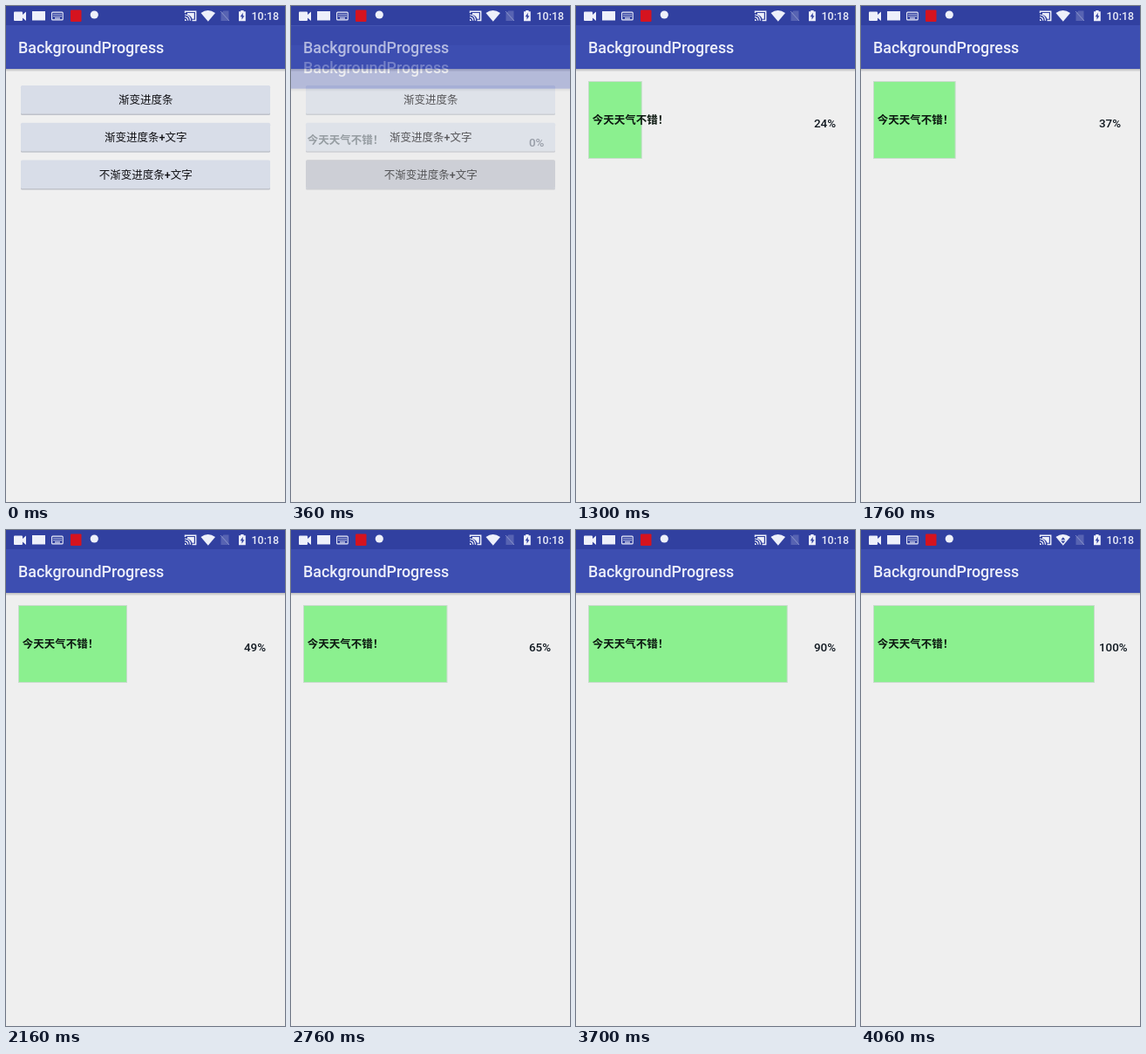
Recreate the animation shown at these times as an HTML page. Size 320 by 568 pixels, loop 4100 ms.

```html
<!DOCTYPE html>
<html lang="zh-CN">
<head>
<meta charset="utf-8">
<title>Progress</title>
<style>
  html, body { margin: 0; width: 100%; height: 100%; overflow: hidden; background: #eeeef0; }
  svg { display: block; width: 320px; height: 568px; }
  text { font-family: Roboto, "Noto Sans CJK SC", "Noto Sans CJK", sans-serif; }
  .title { font-size: 17.85px; font-weight: 500; fill: #edeffa; }
  .button { font-size: 12.5px; font-weight: 500; fill: #101014; text-anchor: middle; }
  .message { font-size: 12.5px; font-weight: 700; fill: #0c1810; }
  .percent { font-size: 13.4px; font-weight: 500; fill: #101820; }
  .clock { font-size: 12.44px; font-weight: 500; fill: #e9ebf7; }
</style>
</head>
<body>
<svg viewBox="0 0 320 568">
  <defs>
    <linearGradient id="shade" x2="0" y2="1">
      <stop stop-color="#000" stop-opacity=".22"/>
      <stop offset="1" stop-color="#000" stop-opacity="0"/>
    </linearGradient>
    <g id="bars">
      <rect y="72" width="320" height="3.5" fill="url(#shade)"/>
      <rect width="320" height="72" fill="#3d4eb1"/>
      <rect width="320" height="22" fill="#3140a0"/>
      <text class="title" x="14" y="54">BackgroundProgress</text>
    </g>
    <clipPath id="pressArea"><rect x="17" y="176" width="286" height="33" rx="2"/></clipPath>
  </defs>

  <rect class="page" width="320" height="568"/>
  <g id="menu"></g>
  <circle id="ripple" cx="160" cy="192" clip-path="url(#pressArea)"/>
  <use href="#bars"/>

  <g id="detail">
    <rect class="page" width="320" height="568"/>
    <use href="#bars"/>
    <rect id="fill" x="14.5" y="86.5" height="88" fill="#8bf08f" stroke="#c6dcca"/>
    <text class="message" x="18.7" y="135"><tspan>今天天气不错！</tspan></text>
    <text class="percent" id="percent" x="273" y="138.5"></text>
  </g>

  <g fill="#eef0fa">
    <path d="M10 6.5h8q1 0 1 1v2.6l4-3.6v10.5l-4-3.6v2.6q0 1-1 1h-8q-1 0-1-1v-8.5q0-1 1-1z"/>
    <rect x="30" y="6" width="15" height="10.5"/>
    <rect x="52.6" y="7.1" width="12.6" height="8.8" rx="1" fill="none" stroke="#eef0fa" stroke-width="1.1"/>
    <path d="M54.4 9.5h9.5M54.4 11.6h9.5" stroke="#eef0fa" stroke-width="1.2" stroke-dasharray="1.2 .8"/>
    <path d="M56 13.9h6" stroke="#eef0fa" stroke-width="1.2"/>
    <rect x="74" y="4.5" width="12.5" height="13.5" rx="1" fill="#d5131f"/>
    <circle cx="101.3" cy="10" r="4.6"/>
    <path d="M205.5 8V6.2h12.2v10.3h-4.2" fill="none" stroke="#eef0fa" stroke-width="1.4"/>
    <path d="M205 10q6.3.4 6.5 6.8M205 12.7q3.6.2 3.8 4.1" fill="none" stroke="#eef0fa" stroke-width="1.2"/>
    <path d="M205 15q1.8.1 1.9 2H205zM208 8h7.8v6.8h-2.4q-.8-3.7-5.4-5z"/>
    <path d="M223.5 8q8-6 16.5 0l-8.2 9.7z"/>
    <path id="traffic" fill="#3140a0" d="M229.3 11.2l2.5-3 2.5 3zM229.3 12.6h5l-2.5 3z"/>
    <path d="M249.5 5.5h6v11.5h-9V8.5z" opacity=".2"/>
    <path d="M246 6l10 11" stroke="#a0a8d4" stroke-opacity=".7"/>
    <path d="M269.2 5h3.4v1.3h2.2v11h-7.8v-11h2.2z"/>
    <path d="M271.7 7.8l-3 4.5h1.8v3.5l2.9-4.6h-1.7z" fill="#3140a0"/>
  </g>
  <text class="clock" x="281.5" y="16">10:18</text>
</svg>
<script>
const LOOP = 4100;
const $ = id => document.getElementById(id);
const pages = document.querySelectorAll('.page');

const clamp = x => Math.min(1, Math.max(0, x));
const ramp = (t, from, to) => clamp((t - from) / (to - from));
const easeOut = x => 1 - (1 - x) ** 3;

// Linear interpolation through [time, value] keys.
function track(keys, t) {
  if (t <= keys[0][0]) return keys[0][1];
  for (let i = 1; i < keys.length; i++) {
    const [t0, v0] = keys[i - 1], [t1, v1] = keys[i];
    if (t <= t1) return v0 + (v1 - v0) * (t - t0) / (t1 - t0);
  }
  return keys[keys.length - 1][1];
}

const progress = [[560, 0], [590, 1], [1300, 24], [2160, 49], [2760, 65], [3260, 79], [4060, 100]];
const pageGrey = [[250, 240], [530, 232], [620, 232], [760, 239]];
const trafficSpans = [[560, 1000], [3230, 3600], [3900, LOOP]];

$('menu').innerHTML = ['渐变进度条', '渐变进度条+文字', '不渐变进度条+文字'].map((label, i) => {
  const y = 91 + i * 42.7;
  return `<rect x="17" y="${y + 1}" width="286" height="33" rx="1.5" fill="#8f96a6" opacity=".5"/>
    <rect x="17" y="${y}" width="286" height="32.6" rx="1.5" fill="#d8dde8"/>
    <text class="button" x="160.2" y="${y + 21.2}">${label}</text>`;
}).join('');

function draw(t) {
  const grey = Math.round(track(pageGrey, t));
  pages.forEach(p => p.setAttribute('fill', `rgb(${grey},${grey},${grey})`));

  $('ripple').setAttribute('r', 150 * easeOut(ramp(t, 30, 300)));
  $('ripple').setAttribute('fill-opacity', 0.12 * ramp(t, 20, 90));

  const enter = ramp(t, 310, 560);
  $('detail').setAttribute('opacity', ramp(t, 310, 470));
  $('detail').setAttribute('transform', `translate(0 ${45 * (1 - easeOut(enter))})`);

  const value = Math.floor(track(progress, t) + 0.001);
  $('fill').setAttribute('width', 2.53 * value);
  $('percent').textContent = value + '%';

  const busy = trafficSpans.some(([from, to]) => t >= from && t < to);
  $('traffic').setAttribute('opacity', busy ? 1 : 0);
}

const start = performance.now();
function tick() {
  draw((performance.now() - start) % LOOP);
  requestAnimationFrame(tick);
}
draw(0);
requestAnimationFrame(tick);
</script>
</body>
</html>
```
